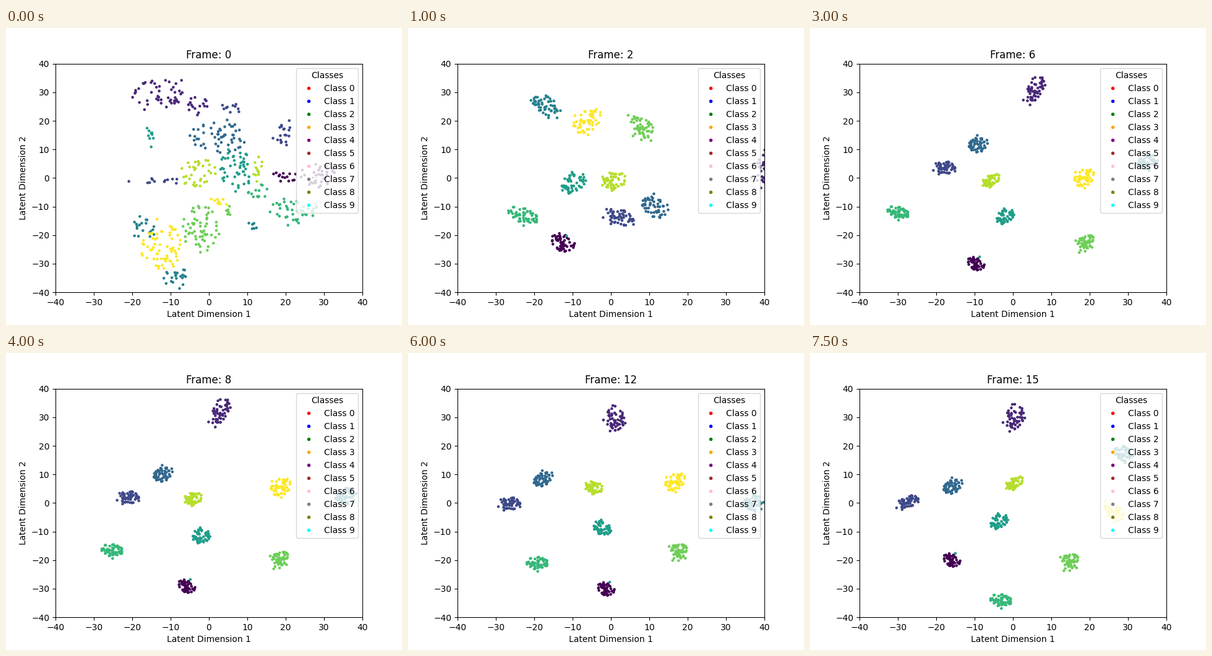
These frames come from a looping animation (640 by 480 pixels, 8000 ms). A matplotlib script:

```python
import matplotlib.pyplot as plt
import numpy as np
from matplotlib.animation import FuncAnimation
from matplotlib.lines import Line2D

FRAMES, INTERVAL = 16, 500
PER_CLASS = 54
rng = np.random.default_rng(12)

# Opening blobs of each class: centre x, y and radii x, y.
START = [
    [(19.7, .7, 3.2, 2.4), (27.7, 1, 5.5, 4.3)],
    [(-13.5, 29.5, 7, 5), (-3.4, 25.5, 4, 2.8)],
    [(19.5, 15, 3, 4.2), (6, 24.5, 2.2, 2.4), (-12, -1, 7, 1)],
    [(2.5, 14.3, 7.5, 5.5)],
    [(-17, -18, 3.2, 4), (-8.7, -35, 3.6, 4), (11.3, -17, 1.2, 2)],
    [(7, 3.5, 4.5, 8), (-15.5, 14.5, 1.2, 4)],
    [(22, -11.5, 7, 4.5), (12.5, -4.5, 3, 2.8)],
    [(-2, -17.5, 4.8, 9), (5.3, -11.3, 1, 2.2)],
    [(-3, 2, 5, 5.2), (13, 2.5, 1.5, 5)],
    [(-12, -24, 6, 8), (2.5, -8.5, 3, 1.5)],
]

# Centres each class visits once the clusters have formed.
PATHS = np.array([
    [(-12.6, -22.6), (-8, -22.4), (-9.7, -30), (-2, -28.3), (-1, -31), (-16, -20)],
    [(41, 3.8), (2.3, 36), (5.8, 31), (.2, 33), (1.6, 27.6), (.5, 30)],
    [(1.8, -14), (-18.4, .5), (-18, 3.3), (-24.4, 0), (-27.7, -.8), (-27.6, 0)],
    [(11.6, -10), (-13.7, 11), (-9, 11.8), (-14.8, 8.7), (-19, 8.5), (-15.6, 6)],
    [(-17, 25), (26.6, 10.4), (35, 5.3), (36.3, -.8), (37.4, 0), (28.7, 17)],
    [(-10.3, -1.7), (0, -8), (-2.4, -13.4), (-2.4, -9.4), (-2.8, -8), (-4, -6.4)],
    [(-23, -13), (-23.7, -16.4), (-30, -12), (-20.6, -21), (-18.6, -21), (-3.2, -34)],
    [(7.9, 17.8), (19.8, -20.7), (18.8, -22.6), (18, -16.6), (17.4, -17), (14.8, -20.4)],
    [(.6, -.8), (-5.8, 2), (-5.8, -.8), (-2.6, 4), (-5.5, 6.3), (.3, 7)],
    [(-6, 20.2), (21.3, -1), (18.7, .3), (19, 11.3), (15.8, 5.7), (26.5, -3)],
])
RADII = [(2.3, 2.3), (2.6, 4.8), (3.3, 2.7), (2.5, 2.8), (2.8, 3.1),
         (2.7, 2.9), (2.9, 2.2), (2.3, 2.8), (2.4, 2.3), (2.7, 3.2)]
TILTS = rng.uniform(-.5, .5, PATHS.shape[:2])


def disc(n):
    """Random points in the unit disc, with a few stragglers outside."""
    a = rng.uniform(0, 2 * np.pi, n)
    r = rng.uniform(0, 1, n) ** .55
    r[rng.random(n) < .05] *= 1.35
    return np.column_stack([r * np.cos(a), r * np.sin(a)])


def ellipse(unit, center, radii, tilt=0):
    x, y = unit.T
    y = tilt * x + np.sqrt(1 - tilt ** 2) * y
    return center + np.column_stack([x, y]) * radii


def opening():
    parts, labels = [], []
    for label, blobs in enumerate(START):
        for cx, cy, rx, ry in blobs:
            n = round(1.25 * rx * ry) + 3
            parts.append(ellipse(disc(n), (cx, cy), (rx, ry)))
            labels += [label] * n
    return np.vstack(parts), np.array(labels)


def mix(keys, u):
    i = min(int(u), len(keys) - 2)
    return keys[i] + (keys[i + 1] - keys[i]) * (u - i)


START_DOTS = opening()
UNITS = [disc(PER_CLASS) for _ in PATHS]
# One class 5 sample stays beside class 0.
LABELS = np.append(np.repeat(np.arange(len(PATHS)), PER_CLASS), 5)


def layout(frame):
    if frame == 0:
        return START_DOTS
    u = np.interp(frame, [2, 3, 4, 6, 10, 13, 14, 15],
                  [0, .9, 1, 2, 3, 4, 4.15, 5])
    grow = np.interp(u, [0, 1, 2], [1.4, 1.1, 1])
    parts = [ellipse(unit, mix(path, u), np.multiply(radii, grow), mix(tilt, u))
             for unit, path, radii, tilt in zip(UNITS, PATHS, RADII, TILTS)]
    stray = mix(PATHS[0], u) + (1, 2.4)
    return np.vstack(parts + [stray]), LABELS


fig, ax = plt.subplots(figsize=(6.4, 4.8), dpi=100)
xy, labels = layout(0)
dots = ax.scatter(*xy.T, c=labels, cmap="viridis", vmin=0, vmax=9, s=5)
ax.set(xlim=(-40, 40), ylim=(-40, 40),
       xlabel="Latent Dimension 1", ylabel="Latent Dimension 2")

colors = ["red", "blue", "green", "orange", "purple",
          "brown", "pink", "gray", "olive", "cyan"]
handles = [Line2D([0], [0], marker="o", color="w", markerfacecolor=c,
                  markersize=5, label=f"Class {i}")
           for i, c in enumerate(colors)]
ax.legend(handles=handles, title="Classes", loc="upper right")


def update(frame):
    xy, labels = layout(frame)
    dots.set_offsets(xy)
    dots.set_array(labels)
    ax.set_title(f"Frame: {frame}")
    return (dots,)


anim = FuncAnimation(fig, update, frames=FRAMES, interval=INTERVAL,
                     repeat=True, repeat_delay=0)
plt.show()
```
